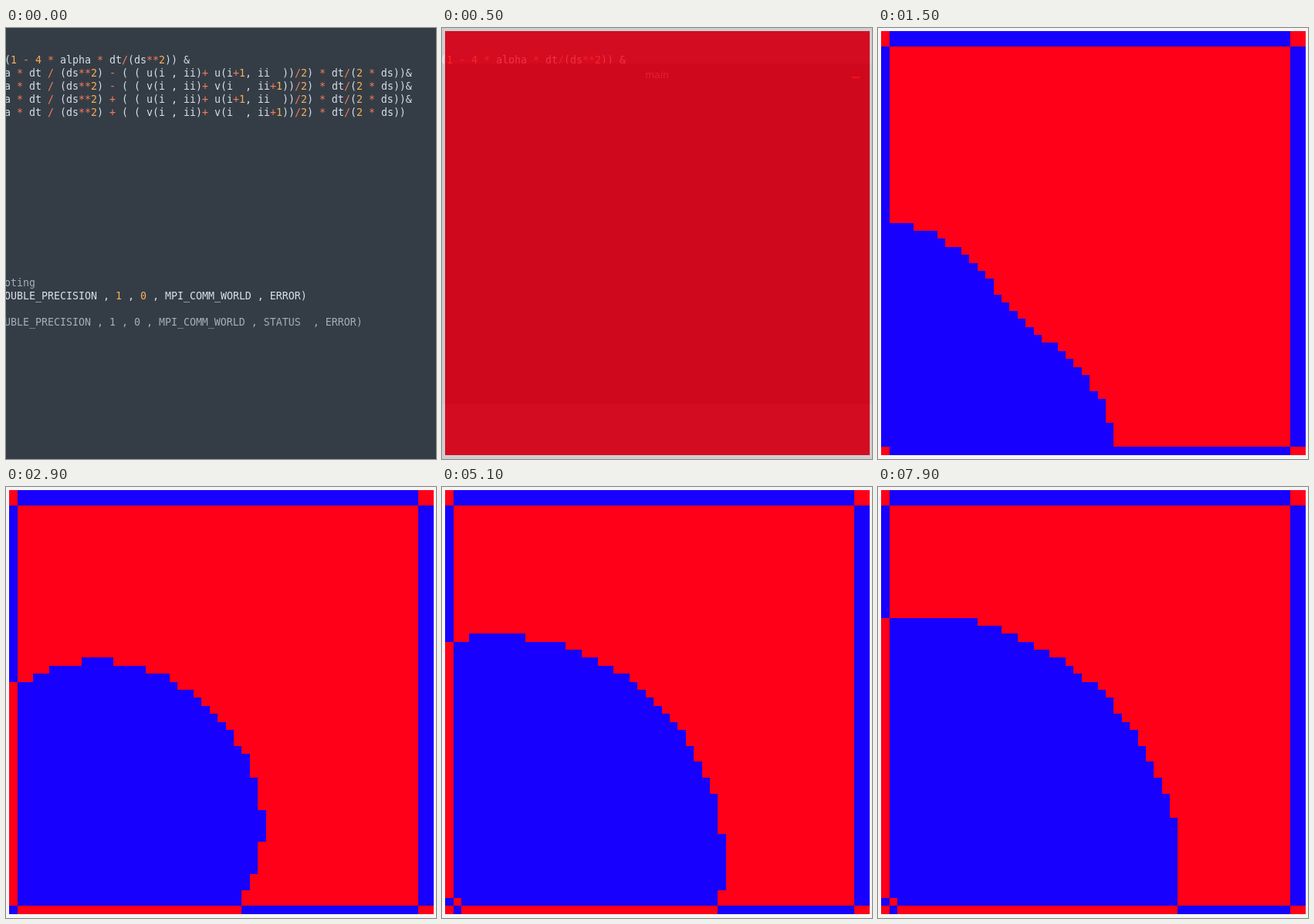
Animation of 557 by 559 pixels, one loop 8000 ms. Source, as an HTML page with a canvas:

```html
<!DOCTYPE html>
<html lang="en">
<head>
<meta charset="utf-8">
<title>Flow field</title>
<style>
  html, body { margin: 0; width: 100%; height: 100%; overflow: hidden; }
  body { position: relative; background: #343d46; }
  pre {
    position: absolute; left: -2px; top: 33px; margin: 0;
    font: 13.29px/17px "DejaVu Sans Mono", monospace; color: #d8dee9;
  }
  .num { color: #f9ae58; }
  .op { color: #f97b58; }
  .note { color: #a6acb9; }
  #win {
    position: absolute; left: 0; top: 46px; width: 557px; height: 442px;
    background: #1f2a30; color: #90979c; text-align: center;
    font: 12.3px/30px "DejaVu Sans", sans-serif;
  }
  #win i { position: absolute; left: 531px; top: 17px; width: 10px; height: 2px; background: #e0453c; }
  canvas { position: absolute; left: 0; top: 0; }
</style>
</head>
<body>
<pre id="code"></pre>
<div id="win">main<i></i></div>
<canvas id="plot" width="557" height="559"></canvas>
<script>
const LOOP = 8000, RED = '#ff0018', BLUE = '#1800ff';
const N = 53, STEP = 10.382;

const term = (sign, v, first, second, end) =>
  `a * dt / (ds**2) ${sign} ( ( ${v}(i , ii)+ ${v}(${first}, ${second}))/2) * dt/(2 * ds))${end}`;
const lines = [
  '(1 - 4 * alpha * dt/(ds**2)) &',
  term('-', 'u', 'i+1', 'ii  ', '&'),
  term('-', 'v', 'i  ', 'ii+1', '&'),
  term('+', 'u', 'i+1', 'ii  ', '&'),
  term('+', 'v', 'i  ', 'ii+1', ''),
  ...Array(12).fill(''),
  '!oting',
  'OUBLE_PRECISION , 1 , 0 , MPI_COMM_WORLD , ERROR)',
  '',
  '!UBLE_PRECISION , 1 , 0 , MPI_COMM_WORLD , STATUS  , ERROR)'
];
const span = (cls, s) => `<span class="${cls}">${s}</span>`;
const paint = s => s[0] === '!'
  ? span('note', s.slice(1))
  : s.replace(/&/g, '&amp;').replace(/(\d+)|[-+*\/]+/g, (m, d) => span(d ? 'num' : 'op', m));
document.getElementById('code').innerHTML = lines.map(paint).join('\n');

// Height per column: rising runs up to the peak, then falling runs, one cell each.
function shape(peak, up, down) {
  const h = [];
  let v = peak - up.length;
  const run = n => { for (let i = 0; i < n; i++) h.push(v); };
  for (const n of up) { run(n); v++; }
  for (const n of down) { run(n); v--; }
  while (h.length < N) h.push(v--);
  return h;
}
const shapes = [
  shape(28, [], [3, 3, 1, 2, 1, 1, 1, 1, 0, 1, 1, 1]),
  shape(31, [2, 2, 4], [4, 4, 3, 1, 2, 1, 1, 1]),
  shape(34, [2], [7, 5, 2, 2, 2, 2, 1, 1, 1]),
  shape(35, [], [11, 3, 3, 2, 1, 2, 1, 2, 1]),
  shape(36, [], [11, 3, 2, 2, 2, 2, 1, 1, 2, 1])
];
// [time, position along shapes]
const track = [
  [1500, 0], [1800, .45], [2100, .86], [2700, .9], [2900, 1], [4900, 2],
  [5100, 2], [5600, 2.45], [5800, 2.55], [6700, 3], [7100, 3.55], [7900, 4]
];
function place(t) {
  const i = track.findIndex(k => k[0] > t);
  if (i < 0) return shapes.length - 1;
  const [t0, p0] = track[i - 1], [t1, p1] = track[i];
  return p0 + (p1 - p0) * (t - t0) / (t1 - t0);
}
function profile(t) {
  if (t < 1500) return Array(N).fill(0);
  const p = place(t), i = Math.min(Math.floor(p), shapes.length - 2);
  return shapes[i].map((v, a) => Math.round(v + (shapes[i + 1][a] - v) * (p - i)));
}

// Ghost cells carry the opposite sign of their inner neighbour.
function isBlue(c, r, h, hole) {
  if (c < 1) return !isBlue(1, r, h, hole);
  if (c > 50) return !isBlue(50, r, h, hole);
  if (r < 2) return !isBlue(c, 2, h, hole);
  if (r > 51) return !isBlue(c, 51, h, hole);
  const a = c - 1, b = 51 - r;
  if (hole && a + b === 0) return false;
  return Math.max(a, b) < h[Math.min(a, b)];
}

const edge = (from, k) => Math.min(554, Math.max(4, Math.round(from + STEP * k)));
const X = k => edge(4.29, k), Y = k => edge(3.47, k);
const canvas = document.getElementById('plot'), g = canvas.getContext('2d');

function drawPlot(t) {
  g.fillStyle = '#f6f6f6';
  g.fillRect(0, 0, 557, 559);
  g.fillStyle = RED;
  g.fillRect(4, 4, 550, 550);
  if (t < 1500) return;
  const tick = t < 2900 ? 300 : 100;
  const now = profile(t), before = profile(t - tick), hole = t >= 4200;
  g.fillStyle = BLUE;
  for (let r = 0; r < N; r++) {
    for (let c = 0; c < N; c++) {
      const inner = c > 0 && c < 51 && r > 1 && r < 52;
      if (isBlue(c, r, inner ? now : before, hole)) {
        g.fillRect(X(c), Y(r), X(c + 1) - X(c), Y(r + 1) - Y(r));
      }
    }
  }
}

const fade = [.27, .53, .79, 1];
const win = document.getElementById('win');
let last = -1;
function frame(ms) {
  const t = ms % LOOP;
  const size = t >= 1500 && t < 2900 ? 300 : 100;
  const step = Math.floor(t / size) * size;
  if (step !== last) {
    last = step;
    const open = step >= 300;
    win.style.visibility = open ? 'visible' : 'hidden';
    canvas.style.opacity = open ? fade[Math.min(3, step / 100 - 3)] : 0;
    drawPlot(step);
  }
  requestAnimationFrame(() => frame(performance.now() - start));
}
const start = performance.now();
frame(0);
</script>
</body>
</html>
```
